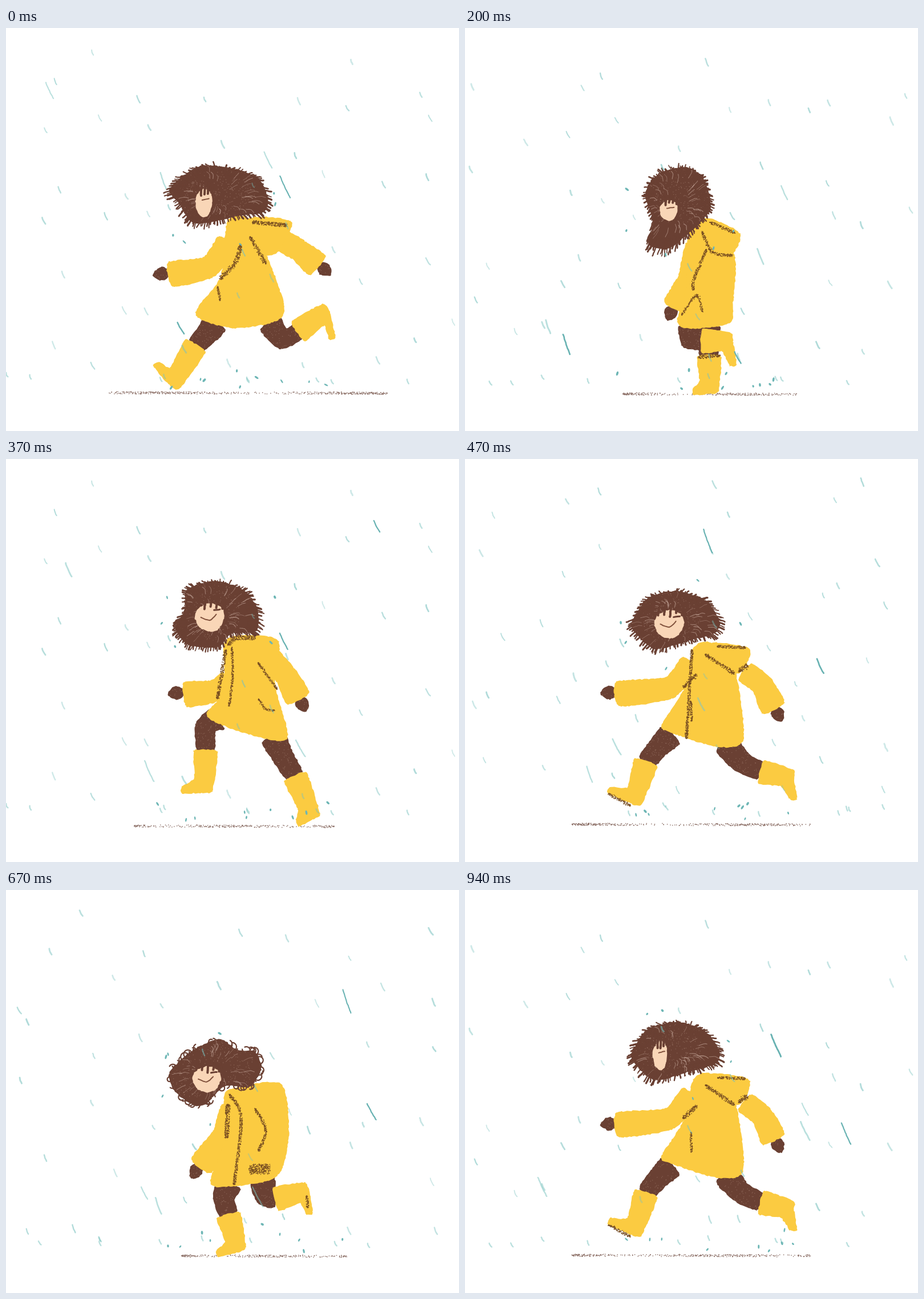
Recreate the animation shown at these times as an HTML page with a canvas. Size 794 by 705 pixels, loop 1010 ms.

```html
<!DOCTYPE html>
<html lang="en">
<head>
<meta charset="utf-8">
<title>Running in the rain</title>
<style>
html,body{margin:0;width:100%;height:100%;overflow:hidden;background:#fff}
canvas{display:block}
</style>
</head>
<body>
<canvas id="c" width="794" height="705"></canvas>
<script>
const g = document.getElementById('c').getContext('2d');
const YELLOW = '#fbcb41', BROWN = '#6a4033', SKIN = '#f9d6b7', INK = '#754c22';

let seed = 1;
const rnd = (a = 1, b = 0) => {
  seed = (seed * 16807) % 2147483647;
  return b + (a - b) * seed / 2147483647;
};
const reseed = n => { seed = n * 7919; rnd(); rnd(); };
const pairs = n => n.reduce((a, v, i) => (i % 2 ? a[a.length - 1].push(v) : a.push([v]), a), []);
const add = (a, b, k = 1) => [a[0] + b[0] * k, a[1] + b[1] * k];
const sub = (a, b) => add(a, b, -1);
const unit = v => { const l = Math.hypot(...v) || 1; return [v[0] / l, v[1] / l]; };
const perp = v => [-v[1], v[0]];
const dot = (a, b) => a[0] * b[0] + a[1] * b[1];
const lerp = (a, b, t) => add(a, sub(b, a), t);

// Soft spline through the points, sampled every few pixels
function curve(p, closed, k = .4, step = 3) {
  const out = [], n = p.length;
  const at = i => closed ? p[(i + n) % n] : p[Math.max(0, Math.min(n - 1, i))];
  for (let i = 0; i < (closed ? n : n - 1); i++) {
    const b = at(i), c = at(i + 1), u = sub(c, at(i - 1)), v = sub(at(i + 2), b);
    const m = Math.max(2, Math.round(Math.hypot(...sub(c, b)) / step));
    for (let j = 0; j < m; j++) {
      const t = j / m, r = 1 - t;
      const q = add(lerp(b, c, t * t * (3 - 2 * t)), u, k * t * r * r);
      out.push(add(q, v, -k * t * t * r));
    }
  }
  if (!closed) out.push(p[n - 1]);
  return out;
}

function trace(p, j) {
  g.beginPath();
  for (const [x, y] of p) g.lineTo(x + rnd(j, -j), y + rnd(j, -j));
}

function blob(p, color, k) {
  trace(curve(p, true, k), .9);
  g.closePath();
  g.fillStyle = color;
  g.fill();
  if (color !== BROWN) return;
  const [cx, cy] = p[0];
  g.save();
  g.clip();
  g.fillStyle = 'rgba(255,225,210,.22)';
  for (let i = 0; i < 900; i++) g.fillRect(cx + rnd(90, -90), cy + rnd(90, -90), 1.2, 1.2);
  g.restore();
}

function stroke(p, w, color) {
  trace(curve(p, false, .5), .3);
  g.lineWidth = w;
  g.strokeStyle = color;
  g.stroke();
}

// Chalk line made of loose grains
function chalk(p, w, color, density = () => .8) {
  g.fillStyle = color;
  const q = curve(p, false, .5, 1.5);
  q.forEach(([x, y], i) => {
    const r = w / 2 * Math.min(1, .45 + Math.min(i, q.length - i) / 8);
    for (let n = w * density(i / q.length); n > rnd(); n--) g.fillRect(x + rnd(r, -r) - .7, y + rnd(r, -r) - .7, 1.4, 1.4);
  });
}

function limb(p, w, color) {
  const side = s => p.map((q, i) =>
    add(q, perp(unit(sub(p[i + 1] || q, p[i - 1] || q))), s * w[i] / 2));
  blob([...side(1), ...side(-1).reverse()], color, .3);
}

function boot([c, h, t]) {
  const toe = sub(t, h), down = sub(h, c);
  let n = unit(perp(down)), s = unit(perp(toe));
  if (dot(n, toe) < 0) n = add([0, 0], n, -1);
  if (dot(s, down) < 0) s = add([0, 0], s, -1);
  blob([add(c, n, -21), add(c, n, 21), add(lerp(c, h, .7), n, 17), add(t, s, -7), add(t, s, 5), add(h, s, 4), add(h, n, -16)], YELLOW, .2);
}

function arm(p) {
  const [, e, w] = p, d = unit(sub(w, e));
  const o = add(add(w, d, 15), [0, -4]), n = perp(d);
  blob([add(o, d, 16), add(o, n, 12), add(o, d, -16), add(o, n, -12)], BROWN, .5);
  limb(p, [36, 39, 43], YELLOW);
}

function hair(p, curly) {
  const c = p.reduce((a, v) => add(a, v, 1 / p.length), [0, 0]);
  blob(p.map(v => lerp(c, v, .95)), BROWN);
  const rim = curve(p, true, .4, 4);
  for (const v of rim) {
    if (curly) {
      if (rnd() > .4) continue;
      const a = rnd(7);
      g.beginPath();
      g.arc(...lerp(c, v, .94), rnd(8, 4), a, a + 4);
      g.lineWidth = 2.2;
      g.strokeStyle = BROWN;
      g.stroke();
    } else {
      const a = lerp(c, v, .72), b = add(lerp(c, v, rnd(1.07, .96)), [rnd(2, -2), rnd(5)]);
      stroke([a, add(lerp(a, b, .5), [rnd(3, -3), -3]), b], rnd(3.4, 1.5), BROWN);
    }
  }
  for (let i = 0; i < 42; i++) {
    const v = rim[Math.floor(rnd(rim.length))], k = rnd(.75, .3);
    const a = lerp(c, v, k), b = lerp(c, v, k + .2);
    stroke([a, add(lerp(a, b, .5), [2, -2]), b], rnd(1.3, .6), 'rgba(235,210,198,.4)');
  }
}

function face([x, y, rx, ry], smile) {
  const at = (u, v) => [x + u * rx, y + v * ry];
  blob([at(0, -1), at(.8, -.7), at(1, 0), at(.6, .8), at(0, 1), at(-.7, .7), at(-1, 0), at(-.8, -.6)], SKIN);
  for (let u = -1; u <= 1; u += .4) stroke([at(u, -1.4), at(u - .1, -1), at(u - .15, rnd(-.5, -.8))], 4, BROWN);
  stroke([at(1, -1), at(1.1, 0), at(.8, .8)], 4, BROWN);
  if (smile) {
    stroke([at(-.6, 0), at(0, .2), at(.45, -.2)], 2, '#80513c');
    stroke([at(.3, -.5), at(.7, -.55)], 3, BROWN);
  } else stroke([at(-.2, -.2), at(.6, -.3)], 2, '#80513c');
}

// legs: hip, knee - boots: cuff, heel, toe - arms: shoulder, elbow, wrist
const contactA = {
  hair: [345, 237, 410, 246, 447, 262, 464, 300, 454, 324, 412, 330, 350, 344, 320, 340, 300, 308, 282, 284, 305, 258],
  face: [347, 306, 15, 25],
  coat: [388, 339, 420, 332, 458, 400, 488, 488, 470, 514, 395, 525, 332, 500, 376, 435],
  hood: [425, 334, 500, 339, 475, 393, 445, 393],
  legs: [[368, 515, 350, 538], [462, 515, 486, 544]],
  boots: [[332, 556, 290, 623, 262, 588], [512, 531, 563, 496, 573, 543]],
  arms: [[388, 375, 355, 418, 288, 431], [485, 372, 515, 390, 546, 416]],
  ink: [[7, 433, 340, 491, 345], [7, 411, 380, 402, 410, 376, 438], [6, 428, 366, 455, 412], [4, 371, 453, 375, 476]],
  ground: [181, 668, 638]
};
const contactB = {
  ...contactA, smile: true,
  face: [356, 303, 28, 25],
  ink: [[7, 422, 338, 495, 347], [5, 395, 336, 393, 430, 388, 521], [7, 379, 348, 375, 390, 360, 430], [4, 446, 448, 469, 464], [6, 422, 367, 455, 412]],
  ground: [225, 668, 641]
};
const downB = {
  curly: true, smile: true,
  hair: [340, 270, 378, 258, 408, 278, 440, 280, 452, 312, 430, 346, 385, 345, 345, 380, 316, 374, 288, 348, 282, 320, 310, 290],
  face: [352, 331, 25, 23],
  coat: [382, 362, 400, 347, 482, 339, 496, 420, 485, 485, 462, 508, 400, 518, 358, 512, 386, 430],
  legs: [[391, 515, 382, 540], [449, 508, 458, 538]],
  boots: [[390, 569, 405, 630, 370, 637], [473, 541, 528, 527, 533, 567]],
  arms: [[396, 380, 380, 430, 342, 483]],
  ink: [[5, 392, 358, 412, 400, 400, 515], [8, 389, 376, 387, 432], [5, 437, 383, 455, 420, 443, 456], [18, 430, 489, 458, 488], [5, 527, 536, 529, 555]],
  ground: [308, 597, 640]
};
const passA = {
  hair: [350, 246, 390, 240, 420, 260, 435, 312, 422, 334, 400, 356, 356, 390, 320, 382, 327, 340, 313, 292, 326, 262],
  face: [357, 319, 16, 18],
  coat: [392, 358, 425, 333, 472, 395, 470, 480, 464, 516, 400, 526, 372, 514, 388, 450],
  hood: [425, 335, 455, 343, 483, 362, 468, 396, 432, 385],
  legs: [[396, 521, 396, 546], [425, 521, 425, 545]],
  boots: [[415, 548, 466, 549, 471, 590], [428, 574, 428, 636, 400, 637]],
  arms: [[405, 380, 392, 440, 368, 488]],
  ink: [[5, 430, 340, 472, 358], [5, 416, 357, 434, 392, 468, 398], [5, 423, 388, 402, 438, 400, 458], [4, 380, 502, 406, 468, 416, 496], [6, 410, 576, 446, 573]],
  ground: [277, 582, 640]
};
const pushA = {
  smile: true,
  hair: [315, 226, 365, 210, 418, 226, 445, 262, 442, 302, 395, 308, 372, 332, 318, 328, 294, 298, 310, 262],
  face: [357, 277, 26, 25],
  coat: [383, 320, 430, 308, 478, 320, 472, 395, 493, 488, 430, 483, 352, 450, 383, 405],
  legs: [[370, 455, 350, 470], [468, 486, 485, 520]],
  boots: [[350, 511, 346, 580, 308, 580], [507, 556, 536, 627, 511, 639]],
  arms: [[390, 388, 365, 406, 314, 412], [460, 345, 490, 378, 512, 419]],
  ink: [[4, 396, 330, 397, 380, 391, 432], [6, 385, 335, 371, 418], [7, 390, 325, 402, 314, 435, 313], [4, 442, 357, 475, 402], [4, 443, 420, 455, 437, 470, 440]],
  ground: [225, 575, 642]
};
const pushB = {
  hair: [350, 230, 400, 225, 432, 250, 450, 308, 425, 318, 390, 345, 345, 368, 334, 345, 340, 300, 325, 275],
  face: [370, 290, 18, 21],
  coat: [403, 345, 438, 303, 465, 345, 490, 420, 476, 504, 395, 485, 350, 455, 385, 415],
  hood: [440, 313, 500, 361, 496, 382, 465, 386],
  legs: [[374, 475, 355, 499], [447, 502, 462, 535]],
  boots: [[370, 522, 402, 580, 382, 600], [482, 567, 508, 626, 490, 637]],
  arms: [[414, 375, 400, 412, 370, 426]],
  ink: [[5, 439, 338, 458, 367, 486, 382], [3, 446, 370, 425, 417], [5, 368, 438, 414, 428, 421, 457], [7, 478, 395, 485, 425]],
  ground: [270, 555, 638]
};
const flightB = {
  hair: [320, 240, 372, 228, 425, 246, 450, 283, 442, 306, 400, 318, 330, 335, 288, 296, 296, 270],
  face: [342, 290, 13, 26],
  coat: [400, 332, 430, 321, 472, 365, 488, 490, 440, 503, 360, 478, 345, 465, 385, 400],
  hood: [428, 323, 497, 331, 490, 366, 470, 374],
  legs: [[362, 482, 340, 503], [456, 497, 485, 530]],
  boots: [[317, 531, 294, 600, 252, 580], [519, 547, 573, 560, 577, 595]],
  arms: [[395, 358, 358, 400, 268, 411], [490, 372, 520, 395, 541, 436]],
  ink: [[5, 443, 328, 491, 330], [6, 422, 342, 471, 375], [9, 481, 371, 494, 361], [7, 383, 399, 405, 378], [4, 396, 424, 397, 458], [5, 252, 586, 289, 606]],
  ground: [188, 605, 639]
};

// In-betweens share a body and change the side turned to us
const downA = { ...downB, smile: false, ink: passA.ink.slice(0, 3) };
const passB = { ...passA, ink: [...passA.ink, [4, 396, 362, 390, 520]] };
const riseA = { ...pushB, smile: true };
const flightA = { ...flightB, smile: true, face: [358, 289, 26, 25], ink: [...flightB.ink, [5, 398, 334, 388, 488]] };

// [duration, pose, rain pattern]; the rain repeats every four drawings
const FRAMES = [
  [100, contactA], [100, downA], [100, passA], [70, riseA], [100, pushA], [100, flightA],
  [100, contactB], [70, downB], [100, passB], [100, pushB], [70, flightB]
];
const LOOP = FRAMES.reduce((s, f) => s + f[0], 0);

function girl(p) {
  const [x0, x1, y] = p.ground, phase = rnd(6);
  chalk([[x0, y], [x1, y + 1]], 4, '#86685f', t => .3 + .18 * Math.sin(t * 11 + phase));
  p.legs.forEach((n, i) => limb([...pairs(n), pairs(p.boots[i])[0]], [42, 38, 30], BROWN));
  p.boots.forEach(n => boot(pairs(n)));
  p.arms.forEach(n => arm(pairs(n)));
  blob(pairs(p.coat), YELLOW);
  if (p.hood) blob(pairs(p.hood), YELLOW);
  for (const [w, ...n] of p.ink) chalk(pairs(n), w, INK);
  hair(pairs(p.hair), p.curly);
  face(p.face, p.smile);
}

function drop(x, y, len, w, color) {
  const a = rnd(1.25, 1), d = [Math.cos(a) * len / 2, Math.sin(a) * len / 2], m = [x, y];
  stroke([sub(m, d), add(m, [-.5, .5]), add(m, d)], w, color);
}

function rain(i, [hx, hy]) {
  reseed(31 + i % 4);
  for (let r = 0; r < 6; r++) for (let c = 0; c < 7; c++)
    drop((c + rnd(.95, .05)) * 113, 40 + (r + rnd()) * 95, rnd(15, 8), rnd(3, 1.8), `rgba(120,193,190,${rnd(.6, .35)})`);
  for (let n = 0; n < 9; n++) drop(rnd(790), rnd(622, 605), 8, 2.4, 'rgba(120,193,190,.5)');
  reseed(57 + i);
  for (let n = 0; n < 5; n++)
    drop(rnd(680, 60), rnd(590, 80), rnd(44, 22), rnd(3, 2), n < 2 ? '#68b2b2' : 'rgba(130,198,195,.55)');
  g.fillStyle = '#6db6b5';
  for (let n = 0; n < 14; n++) {
    const a = rnd(7), near = n < 5;
    g.beginPath();
    g.ellipse(near ? hx + 20 + 105 * Math.cos(a) : rnd(600, 260), near ? hy + 80 * Math.sin(a) : rnd(632, 560 + n * 4),
      rnd(4, 2.2), rnd(2, 1.2), rnd(2.4, .4), 0, 7);
    g.fill();
  }
}

function draw(i) {
  const pose = FRAMES[i][1];
  g.fillStyle = '#fff';
  g.fillRect(0, 0, 794, 705);
  g.lineCap = g.lineJoin = 'round';
  reseed(100 + i);
  girl(pose);
  rain(i, pose.face);
}

const start = performance.now();
let shown = -1;
function tick() {
  let t = (performance.now() - start) % LOOP, i = 0;
  while (t >= FRAMES[i][0]) t -= FRAMES[i++][0];
  if (i !== shown) draw(shown = i);
  requestAnimationFrame(tick);
}
tick();
</script>
</body>
</html>
```
